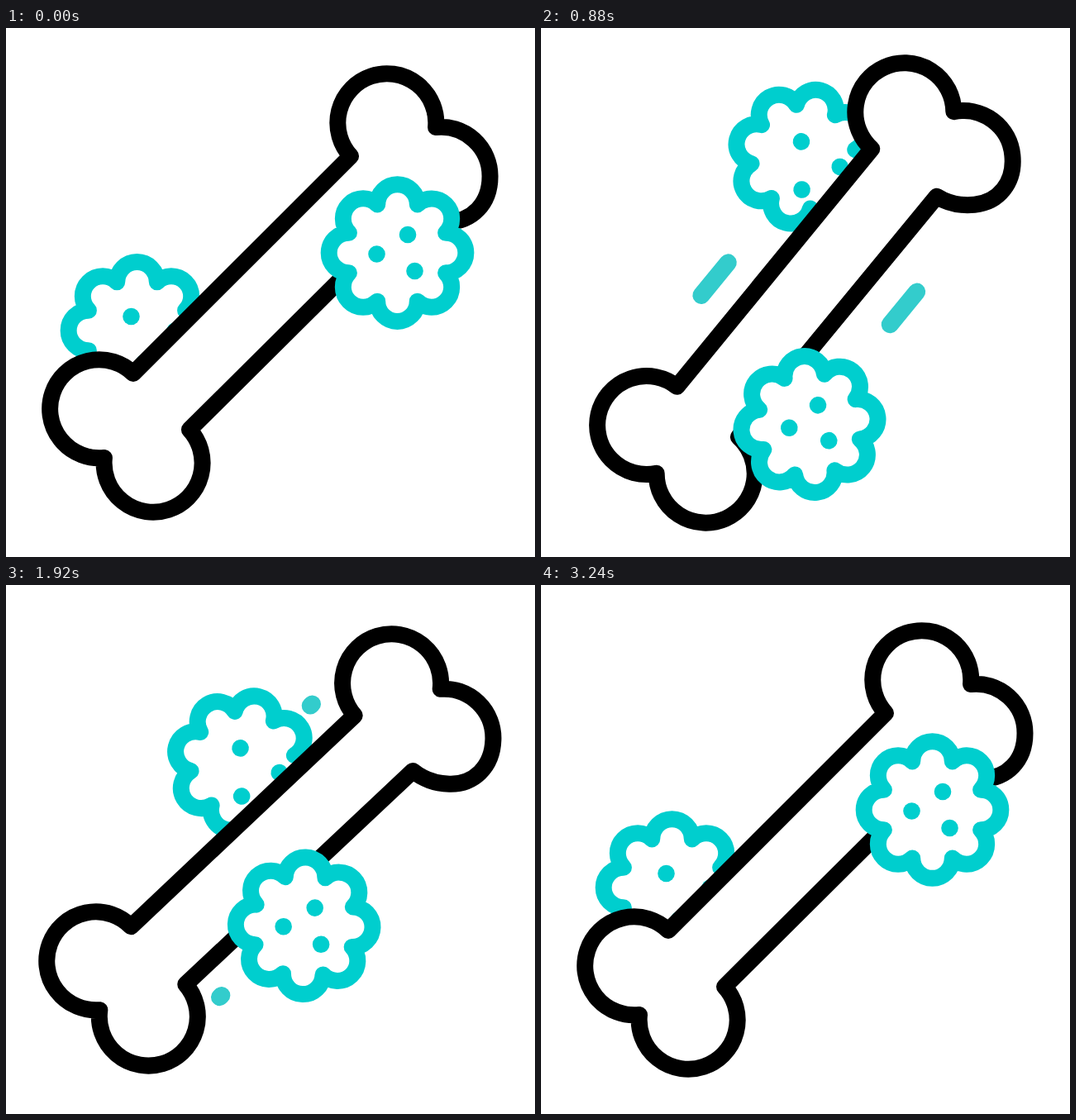
An HTML page for the animation above (3360 ms loop, 640x640 px).

```html
<!DOCTYPE html>
<html>
<head>
<meta charset="utf-8">
<style>
  html, body { margin: 0; width: 100%; height: 100%; overflow: hidden; background: #fff; }
  svg { display: block; width: 100vw; height: 100vh; }
  .bone, .blob path { fill: #fff; stroke: #000; stroke-width: 20; stroke-linejoin: round; }
  .blob path { stroke: #00cece; }
  .blob circle { fill: #00cece; }
  .streak { stroke: #33cccc; stroke-width: 21; stroke-linecap: round; }
</style>
</head>
<body>
<svg viewBox="0 0 640 640">
  <g id="scene">
    <g id="streaks" transform="rotate(-45)"></g>
    <g id="left" class="blob"></g>
    <path class="bone" transform="translate(-319.5 -320)" d="M417 155
      A59.5 59.5 0 1 1 520 120 A59.5 59.5 0 0 1 585.5 179.5
      C585.5 213 563 234.5 534 234.5 C517 234.5 501 229 489.5 220
      L222 486 A59.5 59.5 0 1 1 119 520 A59.5 59.5 0 1 1 154 418 Z"/>
    <g id="right" class="blob"></g>
  </g>
</svg>
<script>
const LOOP = 3360, STEP = 40, REST = 3240;
const $ = id => document.getElementById(id);

function add(parent, tag, attrs) {
  const el = document.createElementNS('http://www.w3.org/2000/svg', tag);
  for (const k in attrs) el.setAttribute(k, attrs[k]);
  return parent.appendChild(el);
}

function ease(u) {
  u = Math.min(1, Math.max(0, u));
  return u * u * (3 - 2 * u);
}

// Five eased swings to alternating sides, each smaller by decay, then back to zero
function wobble(t, { start, step, peak, decay }) {
  let value = 0, from = 0;
  for (let i = 0; i < 6; i++) {
    const to = i < 5 ? peak * (-decay) ** i : 0;
    const begin = start + i * step;
    value += (to - from) * ease((t - begin) / Math.min(step, REST - begin));
    from = to;
  }
  return value;
}

// Ring of eight half-circle lobes; the tiny radius grows to half of each chord
function ring() {
  const cusps = Array.from({ length: 8 }, (_, i) => {
    const a = (i + 0.5) * Math.PI / 4;
    return `${63.4 * Math.cos(a)} ${63.4 * Math.sin(a)}`;
  });
  return `M${cusps[7]}` + cusps.map(p => `A1 1 0 0 1 ${p}`).join('') + 'Z';
}

const swing = { start: -12, step: 407, peak: 9.3, decay: 0.73 };

const blobs = [
  {
    el: $('left'), home: [-161, 46], move: [179.4, -214.9],
    dots: [[-7, -17], [8.5, 39], [46, 0.5]],
    back: 1644, backTime: 753,
    spin: { start: 243, step: 518, peak: 27, decay: 0.78 }
  },
  {
    el: $('right'), home: [154, -48], move: [-168.3, 212.4],
    dots: [[12.5, -22], [-25, 1.5], [21, 22]],
    back: 1567, backTime: 893,
    spin: { start: 68, step: 520, peak: 28.3, decay: 0.72 }
  }
];
for (const b of blobs) {
  add(b.el, 'path', { d: ring() });
  for (const [cx, cy] of b.dots) add(b.el, 'circle', { cx, cy, r: 10.3 });
}

// Streaks run along the bone, one on each side per pass; the tail lags the head
const passes = [
  { start: 244, from: 197, to: 17, gap: 99.5, cx: 2, cy: 4.5 },
  { start: 1866, from: -162.5, to: 72.5, gap: 90.5, cx: -4.5, cy: -2.5 }
];
const streaks = passes.flatMap(({ start, from, to, gap, cx, cy }) => [-1, 1].map(side => {
  const y = cy + side * gap;
  return {
    el: add($('streaks'), 'line', { class: 'streak', y1: y, y2: y }),
    start, a: cx + side * from, b: cx + side * to
  };
}));

function draw(t) {
  $('scene').setAttribute('transform', `translate(319.5 320) rotate(${wobble(t, swing)})`);
  for (const { el, home, move, back, backTime, spin } of blobs) {
    const k = ease((t - 122) / 835) - ease((t - back) / backTime);
    const [x, y] = home.map((p, i) => p + move[i] * k);
    el.setAttribute('transform', `translate(${x} ${y}) rotate(${wobble(t, spin)})`);
  }
  for (const { el, start, a, b } of streaks) {
    const run = begin => a + (b - a) * ease((t - begin) / 780);
    const head = run(start), tail = run(start + 180);
    el.setAttribute('x1', tail);
    el.setAttribute('x2', head);
    el.setAttribute('visibility', head === tail ? 'hidden' : 'visible');
  }
}

const begin = performance.now();
function tick() {
  const t = (performance.now() - begin) % LOOP;
  draw(Math.floor(t / STEP) * STEP);
  requestAnimationFrame(tick);
}
tick();
</script>
</body>
</html>
```
